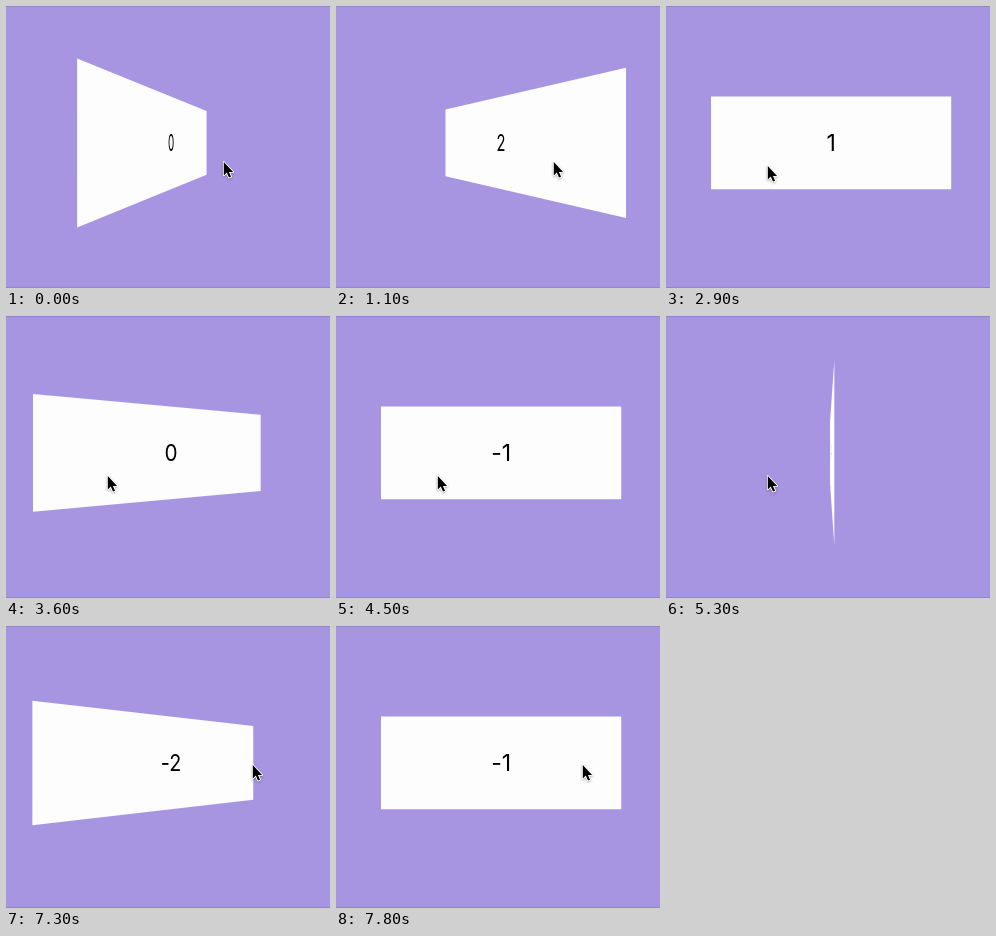
These frames come from a looping animation (324x282 px, 8000 ms). An HTML page:

```html
<!DOCTYPE html>
<html lang="en">
<head>
<meta charset="utf-8">
<title>Flip counter</title>
<style>
  html, body { margin: 0; width: 100%; height: 100%; overflow: hidden; }
  body {
    box-sizing: border-box;
    background: #a795e1;
    border: solid #9585ca;
    border-width: 1px 0;
  }
  svg { position: fixed; left: 0; top: 0; }
  #label {
    font: 23px Inter, sans-serif;
    font-feature-settings: "calt" 0;
    text-anchor: middle;
  }
  #cursor { filter: drop-shadow(0 1px 1px rgba(0, 0, 0, .3)); }
</style>
</head>
<body>
<svg width="324" height="282">
  <polygon id="card" fill="#fdfdfd"/>
  <text id="label" y="145.3"></text>
  <path id="cursor" d="M.8 2v13.4l3-2.8 2.2 5 2.1-.9-2.2-4.8h4.2Z"
        stroke="#fff" stroke-width="1.8" stroke-linejoin="round" paint-order="stroke"/>
</svg>
<script>
const LOOP = 8000, STEP = 100, FLIP = 585;
const CX = 165.1, CY = 136.9, HALF_W = 120.1, HALF_H = 46.3, DEPTH = 240;
const [card, label, cursor] = ['card', 'label', 'cursor'].map(id => document.getElementById(id));

const clicks = [-210, 678, 2252, 3097, 3820, 5010, 7200];
const home = { x: 217, y: 154 };
const moves = [
  { start: 1700, end: 1800, x: 150, y: 139 },
  { start: 1800, end: 1900, x: 101, y: 158 },
  { start: 5700, end: 5900, x: 198, y: 144 },
  { start: 5900, end: 6600, x: 246, y: 137 },
];

const progress = (t, start, end) => Math.min(1, Math.max(0, (t - start) / (end - start)));
const smooth = p => p * p * (3 - 2 * p);

function pointerAt(t) {
  let { x, y } = home;
  for (const move of moves) {
    const p = smooth(progress(t, move.start, move.end));
    x += (move.x - x) * p;
    y += (move.y - y) * p;
  }
  return { x, y };
}

// A click on the right half counts up, on the left half down
function cardAt(t) {
  let count = 0, angle = 0;
  for (const click of clicks) {
    const p = progress(t, click, click + FLIP);
    const dir = pointerAt(click).x > CX ? 1 : -1;
    if (p > .5) count += dir;
    // Past edge-on the new face swings in from the opposite side
    if (p > 0 && p < 1) angle = dir * Math.PI * (p > .5 ? p - 1 : p);
  }
  return { count, angle };
}

function project(x, y, angle) {
  const w = 1 + x * Math.sin(angle) / DEPTH;
  return [CX + x * Math.cos(angle) / w, CY + y / w];
}

function draw(now) {
  const t = Math.floor(now % LOOP / STEP) * STEP;
  const { count, angle } = cardAt(t);
  const { x, y } = pointerAt(t);
  const corners = [[-1, -1], [1, -1], [1, 1], [-1, 1]];
  card.setAttribute('points', corners.map(([h, v]) => project(h * HALF_W, v * HALF_H, angle)).join(' '));
  label.textContent = count;
  label.setAttribute('transform', `translate(${CX}) scale(${Math.cos(angle)} 1)`);
  cursor.setAttribute('transform', `translate(${x} ${y})`);
}

let began;
function tick(now) {
  began ??= now;
  draw(now - began);
  requestAnimationFrame(tick);
}
draw(0);
requestAnimationFrame(tick);
</script>
</body>
</html>
```
